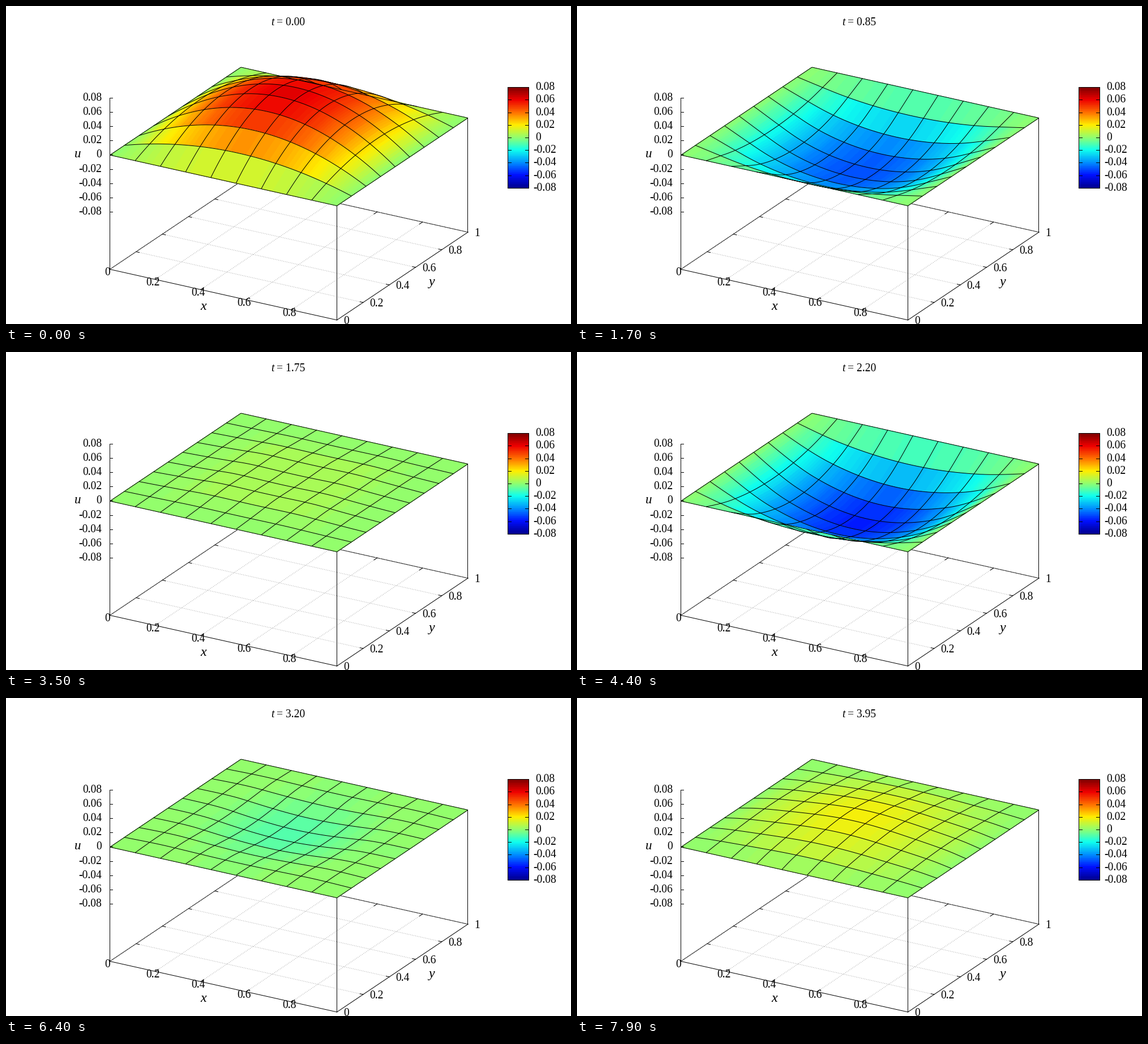
These frames come from a looping animation (998x561 px, 8 s). A matplotlib script:

```python
import numpy as np
import matplotlib.pyplot as plt
from matplotlib.animation import FuncAnimation
from matplotlib.collections import LineCollection, PolyCollection
from matplotlib.colors import LinearSegmentedColormap

W, H, DPI = 998, 561, 64
PX = 72 / DPI
FRAMES, STEP_MS, DT = 80, 100, 0.05
UMAX = 0.08

# Oblique projection: base corner, axis vectors, height of the u range
CORNER = np.array([183, 464])
VX, VY = np.array([401, 89.5]), np.array([231.5, -155])
RANGE = 201.5
GRID = np.linspace(0, 1, 10)
FINE = np.linspace(0, 1, 100)

plt.rcParams["font.family"] = "Liberation Serif"
cmap = LinearSegmentedColormap.from_list("heat", [
    "#000090", "#000fff", "#0090ff", "#0fffee", "#90ff70",
    "#ffee00", "#ff7000", "#ee0000", "#7f0000"], N=128)

fig = plt.figure(figsize=(W / DPI, H / DPI), dpi=DPI, facecolor="white")
ax = fig.add_axes([0, 0, 1, 1])
ax.axis("off")


def base(x, y):
    return CORNER + x * VX + y * VY


def project(x, y, u):
    x, y, u = np.broadcast_arrays(x, y, u)
    px = CORNER[0] + x * VX[0] + y * VY[0]
    py = CORNER[1] - RANGE + x * VX[1] + y * VY[1] - u * RANGE / (2 * UMAX)
    return np.stack([px, py], axis=-1)


def segment(p, q, color="black", z=1, **kw):
    # Coordinates are pixel centres, so snapping would shift the line
    ax.plot([p[0], q[0]], [p[1], q[1]], color=color, lw=PX, zorder=z,
            snap=False, solid_capstyle="projecting", **kw)


def label(x, y, s, ha="center", size=19.6, **kw):
    """Text whose digits are vertically centred on y."""
    return ax.text(x, y + 6.5, s, ha=ha, va="baseline",
                   fontsize=size * PX, zorder=6, **kw)


def dotted(p, q):
    segment(p, q, "#a0a0a0", dashes=(1, 2))


def draw_base():
    c00, c10, c11, c01 = base(0, 0), base(1, 0), base(1, 1), base(0, 1)
    segment(c00, c01)
    segment(c01, c11)
    dotted(c00, c01)
    dotted(c01, c11)
    for k in (0.2, 0.4, 0.6, 0.8):
        dotted(base(k, 0), base(k, 1))
        dotted(base(0, k), base(1, k))
    tx, ty = 0.014, 0.024
    for k in (0.2, 0.4, 0.6, 0.8):
        segment(base(k, 0), base(k, ty))
        segment(base(k, 1), base(k, 1 - ty))
        segment(base(0, k), base(tx, k))
        segment(base(1, k), base(1 - tx, k))
    segment(c00, c10, z=4)
    segment(c10, c11, z=4)
    for c in (c10, c11):
        x = int(c[0])
        segment((x, c[1]), (x, c[1] - RANGE), z=4)
    for k in range(6):
        s = f"{k / 5:g}"
        if k < 5:
            x, y = base(k / 5, 0)
            label(x - 4, y + 4, s)
        x, y = base(1, k / 5)
        label(x + 11.5, y + 1, s, "left")
    label(348.5, 529, "x", size=24, style="italic")
    label(752, 486, "y", size=24, style="italic")


def draw_scales():
    left, right, top, bottom = 886, 923, 143, 321
    segment(CORNER, (CORNER[0], round(CORNER[1] - 1.5 * RANGE)), z=4)
    ax.imshow(np.linspace(1, 0, 256)[:, None], cmap=cmap, aspect="auto",
              extent=(left, right, bottom, top), interpolation="nearest",
              zorder=2)
    for x in (left, right):
        segment((x, top), (x, bottom), z=4)
    for y in (top, bottom):
        segment((left, y), (right, y), z=4)
    for k in range(-4, 5):
        s = f"{k / 50:g}"
        y = round(CORNER[1] - RANGE - k * RANGE / 8)
        segment((183, y), (188, y), z=4)
        label(169, y - 1.7, s, "right")
        y = round((top + bottom) / 2 - k * (bottom - top) / 8)
        segment((left, y), (left + 6, y), z=4)
        segment((right - 6, y), (right, y), z=4)
        label(930.5 if k < 0 else 935, y - 2, s, "left")
    label(126.5, 260, "u", size=23, style="italic")


# Wave equation on the unit square, starting from x(1-x)y(1-y) at rest
ODD = np.arange(1, 60, 2)
AMP = 64 / np.pi**6 / np.outer(ODD, ODD) ** 3
FREQ = np.pi * np.hypot(ODD[:, None], ODD[None, :])
SIN_GRID = np.sin(np.pi * np.outer(GRID, ODD))
SIN_FINE = np.sin(np.pi * np.outer(FINE, ODD))

draw_base()
draw_scales()
strips = PolyCollection([], antialiased=False, linewidths=0, zorder=2)
mesh = LineCollection([], colors="black", linewidths=PX, zorder=3)
for part in (strips, mesh):
    part.set_snap(False)
    ax.add_collection(part)
label(468, 26.5, "t", "left", style="italic")
clock = label(478, 26.5, "", "left")
ax.set_xlim(-0.5, W - 0.5)
ax.set_ylim(H - 0.5, -0.5)


def draw(i):
    t = i * DT
    modes = AMP * np.cos(FREQ * t)
    u = SIN_GRID @ modes @ SIN_FINE.T
    rows = project(FINE[None, :], GRID[:, None], u)
    cols = project(GRID[:, None], FINE[None, :], u)

    # One flat colour per strip, painted from back to front
    quads = np.stack([rows[:-1, :-1], rows[:-1, 1:],
                      rows[1:, 1:], rows[1:, :-1]], axis=2)[::-1]
    mean = (u[:-1, :-1] + u[:-1, 1:] + u[1:, 1:] + u[1:, :-1])[::-1] / 4
    strips.set_verts(quads.reshape(-1, 4, 2))
    strips.set_facecolor(cmap((mean.ravel() + UMAX) / (2 * UMAX)))
    mesh.set_segments(list(rows) + list(cols))
    clock.set_text(f"= {t:.2f}")
    return strips, mesh, clock


anim = FuncAnimation(fig, draw, frames=FRAMES, interval=STEP_MS,
                     repeat=True, repeat_delay=0, blit=False)
plt.show()
```
